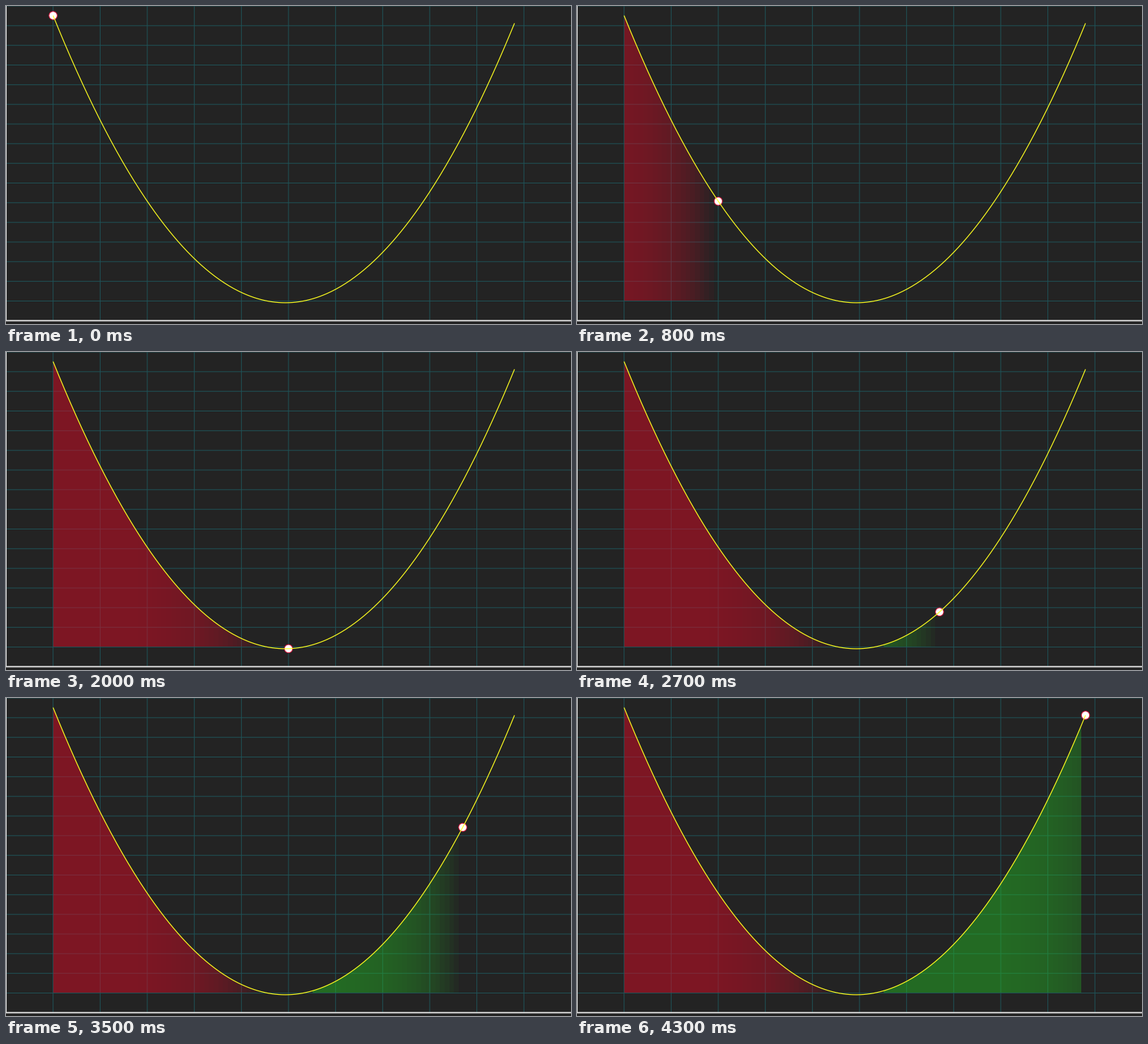
Animation, 800 px wide and 450 px high, one loop 4.4 s. Source, as a matplotlib script:

```python
import numpy as np
import matplotlib.pyplot as plt
from matplotlib.animation import FuncAnimation
from matplotlib.patches import Circle, Polygon

W, H, DPI = 800, 450, 100
FRAMES, INTERVAL = 44, 100
PX = 72 / DPI                  # one pixel in points
UX, UY, AXIS_Y = W / 12, 27.83, 445.3
STEPS = 98                     # the dot walks from x = 1 to 10.8 by 0.1
RED_END, GREEN_START = 45, 55  # where the curve dips under y = 1
RED = np.array([217, 9, 35]) / 255
GREEN = np.array([37, 179, 37]) / 255


def curve(x):
    return 0.6 * (x - 5.9333) ** 2 + 0.912


def to_px(x, y):
    return x * UX, AXIS_Y - y * UY


fig = plt.figure(figsize=(W / DPI, H / DPI), dpi=DPI, facecolor="#232323")
ax = fig.add_axes([0, 0, 1, 1])
ax.axis("off")


def rule(xs, ys, color, width, z):
    # Unsnapped, so lines keep their fractional pixel places
    ax.plot(xs, ys, color=color, lw=width * PX, snap=False,
            solid_capstyle="butt", zorder=z)


# Grid and axes
for i in range(1, 12):
    rule([i * UX] * 2, [0, AXIS_Y], "#1f5358", 1, 1)
for i in range(1, 17):
    rule([0, W], [AXIS_Y - i * UY] * 2, "#1f5358", 1, 1)
rule([0, 0], [0, AXIS_Y], "#dcdcdc", 2, 1.5)
rule([0, W], [AXIS_Y, AXIS_Y], "#dcdcdc", 2, 1.5)

# Shaded area: one column per step, cut out by the curve
xs = np.linspace(1, 1 + STEPS / 10, 400)
cols = np.arange(STEPS)
shade = np.zeros((1, STEPS, 4))
shade[0, :, :3] = np.where((cols < 50)[:, None], RED, GREEN)
x0, base = to_px(1, 1)
x1, top = to_px(1 + STEPS / 10, 16)
area = ax.imshow(shade, extent=(x0, x1, base, top), aspect="auto",
                 interpolation="nearest", zorder=2)
outline = list(zip(*to_px(xs, np.maximum(curve(xs), 1))))
mask = Polygon(outline + [(x1, base), (x0, base)], transform=ax.transData)
area.set_clip_path(mask)

dot = Circle((0, 0), 5.75, fc="white", ec="#dc143c", lw=PX, zorder=3)
ax.add_patch(dot)
rule(*to_px(xs, curve(xs)), "#ffff1e", 1.2, 4)

ax.set_xlim(0, W)
ax.set_ylim(H, 0)


def update(frame):
    n = frame * 5 // 2
    # Every step lays one more thin coat over all finished columns
    red = np.where(cols < RED_END - 1, min(n, RED_END) - 1 - cols, 0)
    green = np.where((cols >= GREEN_START) & (cols < STEPS - 1),
                     n - 1 - cols, 0)
    coats = np.clip(np.where(cols < 50, red, green), 0, 27)
    shade[0, :, 3] = 0.53 * (1 - 0.9 ** coats)
    area.set_data(shade)
    x = 1 + min(n, STEPS) / 10
    dot.center = to_px(x, curve(x))
    return area, dot


anim = FuncAnimation(fig, update, frames=FRAMES, interval=INTERVAL,
                     init_func=lambda: update(0), repeat=True, repeat_delay=0)
plt.show()
```
